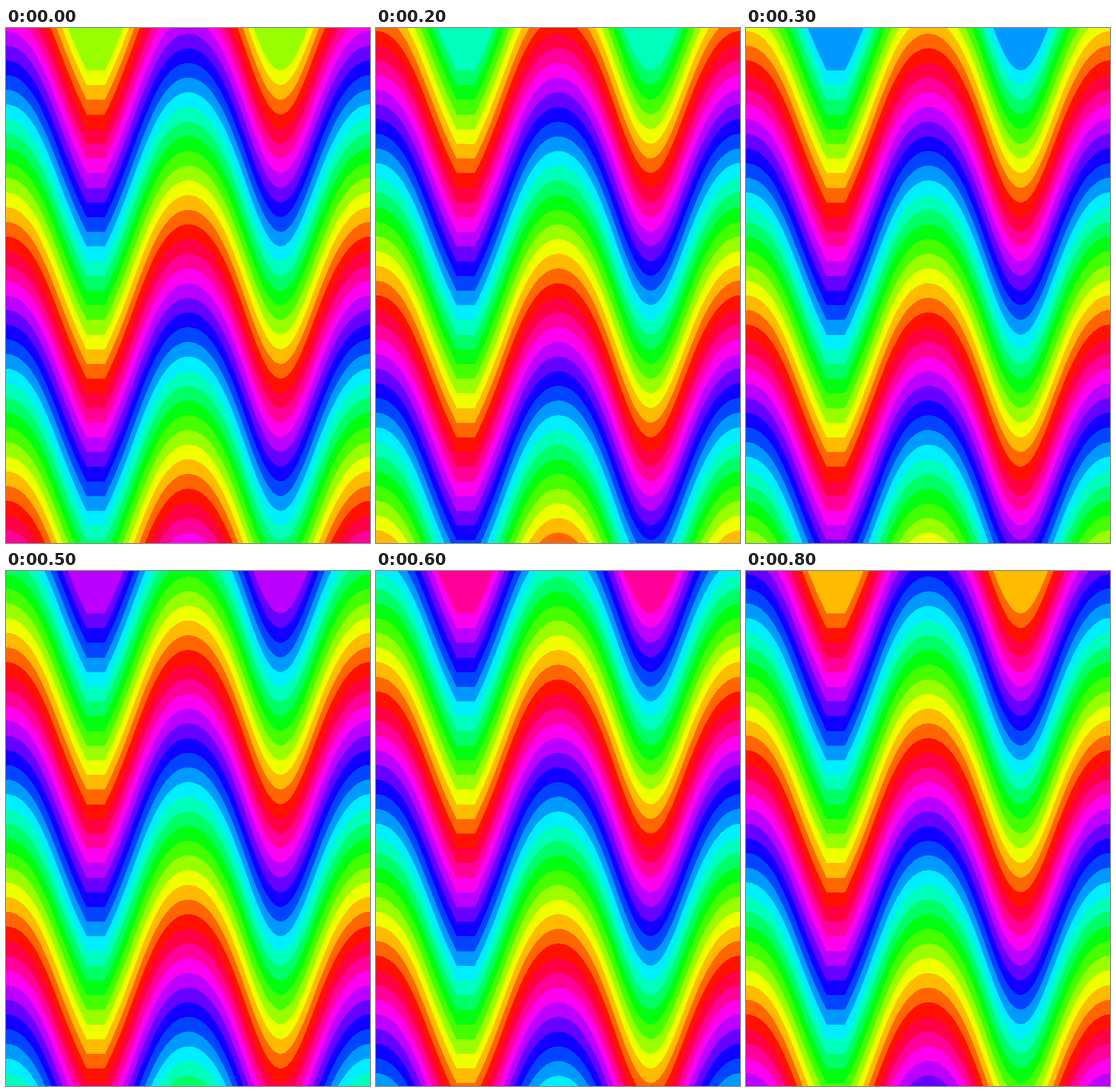
Recreate the animation shown at these times as an HTML page. Size 600 by 849 pixels, loop 900 ms.

```html
<!DOCTYPE html>
<html lang="en">
<head>
<meta charset="utf-8">
<title>Rainbow waves</title>
<style>
  html, body { margin: 0; width: 100%; height: 100%; overflow: hidden; }
  svg { display: block; }
</style>
</head>
<body>
<svg width="600" height="849" shape-rendering="crispEdges"></svg>
<script>
const W = 600, H = 849;
const PITCH = 24.2;                        // vertical distance between bands
const TROUGH = 70;                         // lowest point of the first wave edge
const CREST = -254.5, SIDE_CREST = -234.5; // heights above the trough
const BANDS = 43;
const STEP_MS = 100, STEPS = 9;

// Two valleys: the first has a flat floor with corners, the second is round.
const wave = `M0 ${SIDE_CREST}
  C58 ${SIDE_CREST} 81 -101 133 0 H163
  C216 -103 241 ${CREST} 301 ${CREST}
  C376 ${CREST} 406 0 453 0
  C496 0 528 ${SIDE_CREST} ${W} ${SIDE_CREST}
  V${H} H0 Z`;

const svg = document.querySelector('svg');

function addPath(d, y) {
  const path = document.createElementNS('http://www.w3.org/2000/svg', 'path');
  path.setAttribute('d', d);
  path.setAttribute('transform', `translate(0 ${y})`);
  return svg.appendChild(path);
}

// Each band covers everything below its edge; the next one lies on top.
const bands = [addPath(`M0 0H${W}V${H}H0Z`, 0)];
for (let i = 0; i < BANDS; i++) bands.push(addPath(wave, TROUGH + PITCH * i));

function draw(step) {
  bands.forEach((band, i) => {
    const hue = (84 + 40 * step - 20 * i + 1080) % 360;
    band.setAttribute('fill', `hsl(${hue}, 100%, 50%)`);
  });
}

let shown = -1;
const start = performance.now();
function tick() {
  const step = Math.floor((performance.now() - start) / STEP_MS) % STEPS;
  if (step !== shown) draw(shown = step);
  requestAnimationFrame(tick);
}
tick();
</script>
</body>
</html>
```
